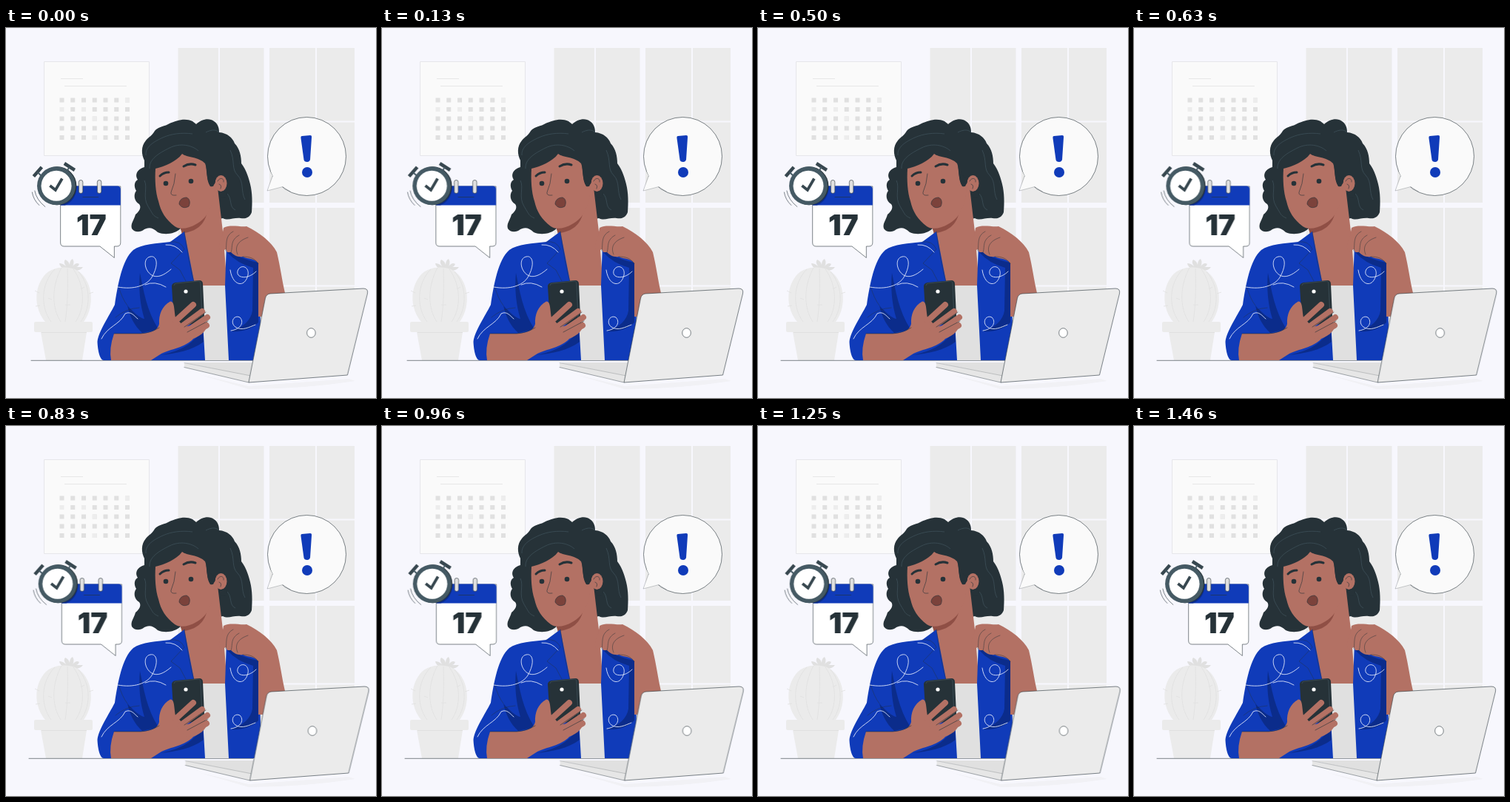
An HTML page without scripts that plays this animation: 500x500 px, repeating every 1500 ms.

```html
<!DOCTYPE html>
<html lang="en">
<head>
<meta charset="utf-8">
<title>Deadline reminder</title>
<style>
  html, body { margin: 0; width: 100%; height: 100%; overflow: hidden; background: #f7f7fd; }
  svg { display: block; width: 100%; height: 100%; }
  .blue { fill: #103bb9; }
  .navy { fill: #0b2c8b; }
  .skin { fill: #b37164; }
  .dark { fill: #263238; }
  .white { fill: #fff; }
  .line { fill: none; stroke: #263238; stroke-width: .6; stroke-linecap: round; stroke-linejoin: round; }
  .curl { fill: none; stroke: #455a64; stroke-width: .6; }
  .print { fill: none; stroke: #dfe6fa; stroke-width: .9; stroke-linecap: round; }
  .edge { stroke: #263238; stroke-width: .6; stroke-linejoin: round; }
  .finger { fill: none; stroke: #b37164; stroke-width: 8; stroke-linecap: round; }
  .day { font: 900 39px Inter, sans-serif; text-anchor: middle; }
  .shake { animation: shake 1.5s -22ms linear infinite; }
  .desk { animation: desk 1.5s step-end infinite; }
  @keyframes shake {
    10%, 90% { transform: translateX(-1px); }
    20%, 80% { transform: translateX(2px); }
    30%, 50%, 70% { transform: translateX(-4px); }
    40%, 60% { transform: translateX(4px); }
  }
  @keyframes desk {
    0% { stroke-dashoffset: -3; }
    28%, 100% { stroke-dashoffset: 0; }
  }
</style>
</head>
<body>
<svg viewBox="0 0 500 500">
  <!-- window -->
  <path fill="#ebebeb" d="M232.500 27H348.500V236H232.500ZM356 27H471V236H356ZM232.500 243H348.500V430H232.500ZM356 243H471V430H356Z"/>
  <path fill="none" stroke="#f7f7fd" stroke-width="2" d="M288 27V430M419 27V430M232 126.500H471M232 348.500H471"/>

  <!-- wall calendar -->
  <path fill="#fafafa" stroke="#e6e6ea" d="M51.500 45.500H193.500V172.500H51.500Z"/>
  <path fill="none" stroke="#e0e0e0" stroke-width=".7" d="M74 68.500H104M79 78.500H163"/>
  <g fill="none" stroke="#e0e0e0" stroke-width="6" stroke-dasharray="6 8.750">
    <path d="M72.500 97.500H167M87.250 110H167M72.500 122.500H167M72.500 135.500H167M72.500 148H167"/>
    <path stroke="#ededed" d="M72.500 110H79M102 110H108M161 97.500H167M116.750 122.500H123M116.750 148H123"/>
  </g>

  <!-- cactus -->
  <g fill="#ebebeb">
    <path fill="#e0e0e0" d="M81 327Q72 323 72 318Q77 318 81 322Q77 316 80 313Q85 315 86 320Q86 314 90 312Q93 317 90 322Q95 316 99 319Q98 322 95 323L104 323Q101 328 93 328Z"/>
    <path d="M53 397C38 379 37 351 53 333C65 321 91 320 103 333C119 350 118 380 105 397Z"/>
    <path fill="none" stroke="#e0e0e0" stroke-width=".8" d="M66 326C46 346 47 379 61 397M75 324C61 350 62 379 74 397M83 325C84 354 83 377 80 397M91 326C107 348 107 379 94 397M98 329C117 352 113 381 101 397M39 355L45 358M40 376L46 375M57 365L62 367M80 374L87 374M101 353L106 350M112 359L118 357"/>
    <path d="M47 411H109L103 449H54Z"/>
    <rect x="38" y="397" width="79" height="14" rx="2"/>
    <path fill="none" stroke="#e0e0e0" d="M48 411.500H109"/>
  </g>

  <!-- alert bubble -->
  <circle class="edge" cx="406.500" cy="173.500" r="53" fill="#fafafa"/>
  <path fill="#fafafa" d="M358 194L361 201L353 220L374 214.500L384 219L382 195Z"/>
  <path class="line" stroke-opacity=".4" d="M360 200L353 220L374 214.500L384 221"/>
  <path class="blue" d="M400 146L411 145Q413.500 145 413 148L411 178Q410 181 407 181Q403 181 402.500 178L398.500 149Q398 146 400 146Z"/>
  <circle class="blue" cx="407" cy="195" r="7"/>

  <path class="line desk" stroke-dasharray="400" d="M31 449.300H334"/>

  <!-- hair -->
  <path class="dark" d="M187 179C183 171 182 160 189 152C193 147 198 145 201 139C206 133 215 133 221 129C230 125 242 121 252 126L257 130C264 123 275 121 281 126C287 130 288 136 288 141C299 142 306 148 309 156C316 163 318 174 318 183C325 192 328 203 330 211C333 223 333 236 332 249C329 257 323 258 317 257C307 256 300 261 293 257L237 270C228 279 214 280 205 276C199 270 193 269 187 272C181 277 173 276 170 271C168 264 173 260 175 252C181 247 183 242 180 238C173 234 172 225 176 220C172 213 174 207 178 205C173 197 179 190 187 188Z"/>
  <path class="curl" d="M189 172C188 160 201 153 212 148S237 141 252 143M194 190C193 177 207 169 221 162S251 158 260 166M288 141C283 136 276 138 270 141M303 165C310 180 304 190 313 199S317 221 323 232M187 206C192 216 184 228 192 241S198 253 206 257M299 224C306 231 301 242 310 246"/>

  <!-- neck, ear and face -->
  <path class="skin" d="M236 262L285 207L293 275L299 349H253C252 325 241 300 236 270Z"/>
  <path fill="#8f4f45" d="M235 269C250 267 263 261 271 252C268 264 258 276 238 277Z"/>
  <ellipse class="skin" cx="290.500" cy="210" rx="8" ry="11"/>
  <path class="line" d="M286 207C289 201 295 203 294 208M288 211Q292 212 290 217"/>
  <circle class="line" cx="294" cy="225" r="4.500"/>
  <path class="skin" d="M202 190C214 187 230 181 238 170C244 175 261 174 269 183C273 193 270 205 276 214L282 215C281 238 274 256 257 265C247 271 235 273 228 268C216 259 209 248 206 234C202 222 201 205 202 190Z"/>
  <path class="dark" d="M270 184C275 191 274 201 281 202L283 207L280 214C272 213 272 202 270 184Z"/>
  <path fill="none" stroke="#263238" stroke-width="3" stroke-linecap="round" d="M208 200Q213 195 220 195M240 187Q248 182 256 185"/>
  <circle class="dark" cx="216" cy="210" r="3.300"/>
  <circle class="dark" cx="250" cy="207" r="3.300"/>
  <path class="line" stroke-width="1.100" d="M229 197Q228 211 223 222Q222 227 230 226"/>
  <path class="edge" fill="#7b423b" d="M234 238C234 232 239 229 244 229C249 231 249 237 247 241C242 244 237 243 234 238Z"/>

  <!-- top and jacket -->
  <path fill="#e0e0e0" d="M254 348H299L302 449H265Z"/>
  <path class="blue" d="M241 275L222 289C204 291 183 292 172 300C157 313 151 347 147 374C139 390 125 410 123.500 424C124 436 127 449 132 449H269L265 380L255 347Z"/>
  <path class="navy" d="M181 331C186 355 190 382 206 407L184 412C173 402 167 389 164 375C174 386 181 392 187 393C181 374 179 352 181 331ZM208 442C230 438 251 430 266 407L267 424C251 436 230 440 208 442Z"/>
  <path class="blue" d="M298 291C312 302 329 307 342 317L344 405L337 449H301L296 348Z"/>
  <path class="navy" d="M299 299Q313 311 341 317V398C333 406 320 411 304 410C321 404 331 395 333 382L334 324Q312 318 299 303Z"/>
  <path class="line" stroke-opacity=".7" d="M241 275Q247 318 255 347M222 289Q236 287 241 299L223 318L235 327L243 342M152 349Q157 366 164 375M148 391Q162 379 180 378"/>
  <path class="print" d="M151 350C173 354 190 348 197 337C207 320 204 307 195 309C184 311 187 330 199 335C208 338 217 331 223 326M129 420C137 403 154 401 161 386C169 382 173 389 178 393M216 293Q229 292 238 303M188 347Q201 341 216 350M303 327C306 348 321 351 326 337C331 325 320 318 314 326C308 337 325 342 338 329M304 409C318 407 322 397 316 391C308 387 302 398 310 404C319 410 329 404 337 401"/>

  <!-- raised arm -->
  <path class="skin" d="M294 270C303 265 315 269 325 268C342 276 359 289 366 303C371 324 373 341 377 358V390H341V318C334 310 328 313 320 309C313 310 308 307 304 303L299 303L297 299L291 302C286 300 288 287 292 281Z"/>
  <path class="line" stroke-opacity=".8" d="M307 275C295 281 299 293 297 301M315 280C302 287 307 297 304 303M327 283C312 288 309 297 313 306M320 309C330 309 335 311 341 318"/>

  <!-- forearm, phone and hand -->
  <path class="dark" d="M229 344L261 341Q266 341 266 346L268 390Q267 398 260 399L233 403Q228 403 227 397L224 349Q224 345 229 344Z"/>
  <path class="curl" d="M227 348Q227 345 231 345L260 342Q263 342 263 347L265 393"/>
  <circle class="white" cx="243" cy="356" r="2.600"/>
  <path class="skin" d="M142 449Q139 433 146 413H182C196 412 205 409 207 400C206 388 211 375 222 369.500C228 369 227 381 229 391L241 404L272 397C273 408 265 415 253 420C242 432 222 434 210 440L196 449Z"/>
  <path class="finger" d="M229 396L253 374M235 405L265 383M241 412L272 391M246 416L271 402"/>
  <path class="line" d="M241 404L270 384M245 411L273 396M146 413H182Q196 412 207 405"/>

  <!-- laptop -->
  <path fill="#f1f1f5" d="M260 468L328 484L463 474L472 477Q400 488 328 488Z"/>
  <g class="shake">
    <path fill="#e0e0e0" d="M241 452H334L331 471Z"/>
    <path fill="#e6e6e6" d="M241 452.500L331 470L328 479L241 458.500Z"/>
    <path class="line" stroke-opacity=".35" d="M241 452.500L331 470"/>
    <path class="line" stroke-opacity=".7" d="M241 458.500L328 479"/>
    <path class="edge" fill="#ebebeb" d="M328 479L350.500 365Q352 359.500 357 359L483 352Q490 352 488.500 359L461.500 469Z"/>
    <ellipse class="white edge" cx="412.500" cy="412" rx="5.800" ry="6.300"/>
  </g>

  <!-- date card and alarm clock -->
  <g class="shake">
    <path class="white edge" d="M73.800 214H155V290Q155 295 150 295H146.500V310.500L127 295H78.500Q73.800 295 73.800 290Z"/>
    <path class="blue" d="M73.800 239.500V218Q73.800 213.500 78 213.500H150.500Q155 213.500 155 218V239.500Z"/>
    <path class="line" d="M104 228.500H125"/>
    <g class="edge" fill="#e0e0e0">
      <rect x="98.500" y="205.500" width="5.500" height="18" rx="2.700"/>
      <rect x="123.500" y="205.500" width="5.500" height="18" rx="2.700"/>
    </g>
    <text class="day dark" x="115.500" y="279.500">17</text>

    <path class="navy" d="M74 214H96Q95 233 80 239.500H74Z"/>
    <circle class="dark" cx="69.500" cy="213.300" r="26"/>
    <circle cx="68.200" cy="213.300" r="26" fill="#455a64"/>
    <circle class="white" cx="68.200" cy="213.300" r="20.500"/>
    <path fill="none" stroke="#37474f" stroke-width="4.500" d="M37.500 200.500L48.500 188M79 183L93 192"/>
    <path fill="none" stroke="#455a64" stroke-width="2" d="M43 195L50 202M86 188L81 195"/>
    <path fill="none" stroke="#37474f" stroke-width="3.800" d="M59.500 213L67 219L76 203.500"/>
    <path class="line" d="M39 220Q41 232 53 241.500M35.500 222Q37 232 45 239.500"/>
  </g>
</svg>
</body>
</html>
```
